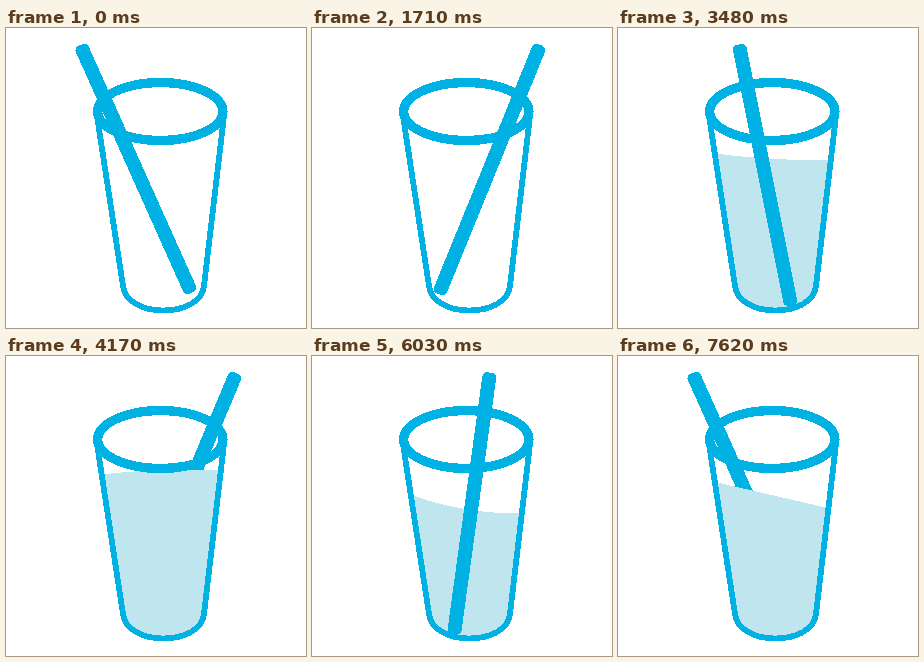
Recreate the animation shown at these times as an HTML page. Size 300 px wide and 300 px high, loop 7.65 s.

```html
<!DOCTYPE html>
<html lang="en">
<head>
<meta charset="utf-8">
<title>Stirred glass</title>
<style>
  html, body { margin: 0; width: 100%; height: 100%; overflow: hidden; background: #fff; }
  svg { display: block; width: 100vw; height: 100vh; shape-rendering: crispEdges; }
  .line { fill: none; stroke: #00b1e4; }
  .straw { fill: #00b1e4; }
  #liquid { fill: #bfe6ee; }
</style>
</head>
<body>
<svg viewBox="0 0 300 300">
  <defs>
    <path id="glass" d="M91 88L117 258C119 274 138 282.5 157 282.5C178 282.5 196 274 198 258L218 88"/>
    <clipPath id="inside"><use href="#glass"/></clipPath>
  </defs>
  <rect id="back" class="straw" x="-7" y="-6.5" width="14" rx="4.5"/>
  <g clip-path="url(#inside)"><path id="liquid"/></g>
  <rect id="front" class="straw" x="-7" y="-6.5" width="14" rx="4.5"/>
  <use href="#glass" class="line" stroke-width="5.8"/>
  <ellipse class="line" stroke-width="9.3" cx="154.3" cy="83.5" rx="62.6" ry="29"/>
</svg>
<script>
  const LOOP = 7650, STEP = 30;
  const SLOW = 1530, FAST = 1140;   // one swing of the straw, first round and later
  const $ = id => document.getElementById(id);
  const back = $('back'), front = $('front'), liquid = $('liquid');

  // Key poses of the surface: time, level, tilt, sag
  const poses = [
    [1500, 300, 0, 0], [2760, 142, -44, 7], [4170, 116.5, -4, -2.5],
    [5430, 147.5, 1, 9.5], [6750, 148.5, -27, 0], [LOOP, 139, 26, 0]
  ];

  // Swings done so far; the slow round sets off gently
  function swings(t) {
    if (t >= 2 * SLOW) return 2 + (t - 2 * SLOW) / FAST;
    const u = t / SLOW, whole = Math.floor(u);
    return whole + (u - whole) ** 1.2;
  }

  function drawStraw(t) {
    const u = swings(t), n = -Math.cos(Math.PI * u);
    const x = 152.5 + 75.5 * n, y = 23;
    const dx = 156 - 27 * Math.sin(n * Math.PI / 2) - x;
    const dy = 259.5 + 13 * (1 - Math.abs(n) ** 3) - y;
    // On the near side the straw passes before the liquid
    const near = u % 2 > 0.12 && u % 2 < 0.75;
    const straw = near ? front : back;
    straw.setAttribute('height', Math.hypot(dx, dy) + 12.5);
    straw.setAttribute('transform',
      `translate(${x} ${y}) rotate(${-Math.atan2(dx, dy) * 180 / Math.PI})`);
    front.style.display = near ? '' : 'none';
    back.style.display = near ? 'none' : '';
  }

  function drawLiquid(t) {
    const i = Math.max(1, poses.findIndex(p => t < p[0]));
    const [a, ...from] = poses[i - 1], [b, ...to] = poses[i];
    const w = Math.PI * Math.max(0, (t - a) / (b - a));
    const k = (1 - Math.cos(w)) / 2;
    let [level, tilt, sag] = from.map((v, j) => v + (to[j] - v) * k);
    tilt += 30 * Math.sin(w) ** 2;   // slosh between poses

    const l = level - tilt / 2, r = level + tilt / 2;
    const xl = 91 + (l - 88) * 0.153, xr = 218 - (r - 88) * 0.118;
    liquid.setAttribute('d',
      `M80 ${l}H${xl}Q${(xl + xr) / 2} ${level + 2 * sag} ${xr} ${r}H230V300H80Z`);
  }

  const start = performance.now();
  function tick() {
    const t = Math.floor((performance.now() - start) % LOOP / STEP) * STEP;
    drawStraw(t);
    drawLiquid(t);
    requestAnimationFrame(tick);
  }
  tick();
</script>
</body>
</html>
```
